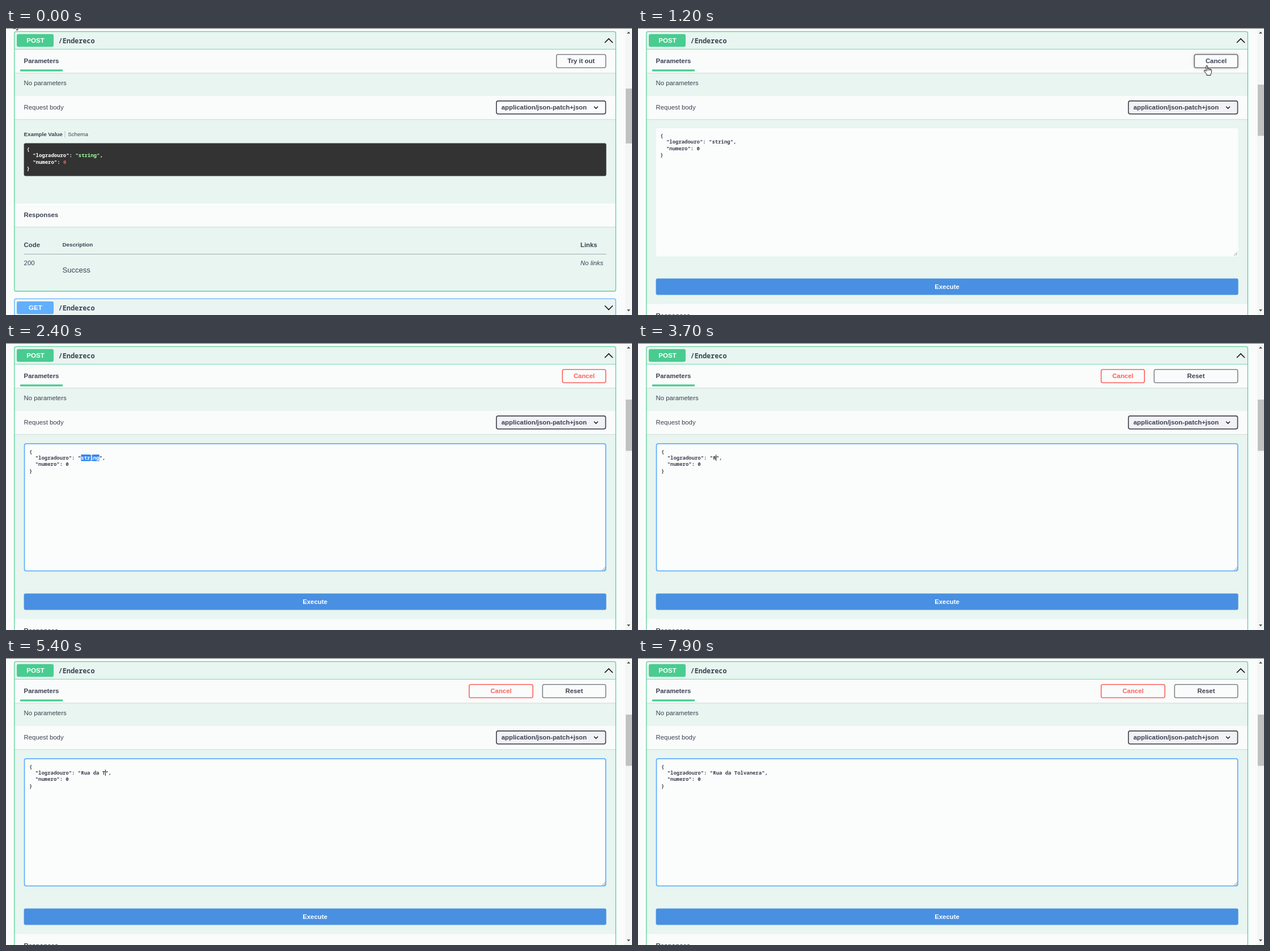
Recreate the animation shown at these times as an HTML page with a canvas. Size 1104 by 507 pixels, loop 8000 ms.

```html
<!DOCTYPE html>
<html lang="pt">
<head>
<meta charset="utf-8">
<title>POST /Endereco</title>
<style>
  html, body { margin: 0; width: 100%; height: 100%; overflow: hidden; background: #fafcfb; }
  canvas { display: block; }
</style>
</head>
<body>
<canvas id="stage" width="1104" height="507"></canvas>
<script>
const ctx = document.getElementById('stage').getContext('2d');
const LOOP = 8000, TICK = 100;
const SANS = '"Liberation Sans", Arial, sans-serif';
const MONO = '"Noto Sans Mono", "DejaVu Sans Mono", monospace';
const INK = '#3b4151', GREEN = '#49cc90', BLUE = '#61affe';
const PANEL = '#e8f5f0', LIGHT = '#fafcfc';
const CHAR = 5.37, LINE = 11.35;
const STREET = 'Rua da Tolvanera';
const KEYS = [3700, 4200, 4400, 4400, 4700, 4800, 5000, 5400,
              5700, 5800, 5900, 6300, 6500, 6600, 7000, 7100];

const clamp = v => Math.max(0, Math.min(1, v));
const easeOut = v => 1 - (1 - clamp(v)) ** 2;
const lerp = (a, b, p) => a + (b - a) * p;
const mix = (a, b, p) => `rgb(${a.map((v, i) => Math.round(lerp(v, b[i], p)))})`;

function rect(x, y, w, h, color) {
  ctx.fillStyle = color;
  ctx.fillRect(x, y, w, h);
}

function box(x, y, w, h, { fill, stroke, line = 1.6, radius = 3, shadow } = {}) {
  ctx.save();
  ctx.beginPath();
  ctx.roundRect(x, y, w, h, radius);
  if (shadow) {
    ctx.shadowColor = `rgba(0,0,0,${shadow.alpha})`;
    ctx.shadowBlur = shadow.blur;
    ctx.shadowOffsetY = shadow.dy || 0;
  }
  if (fill) { ctx.fillStyle = fill; ctx.fill(); }
  ctx.shadowColor = 'transparent';
  if (stroke) { ctx.strokeStyle = stroke; ctx.lineWidth = line; ctx.stroke(); }
  ctx.restore();
}

function text(str, x, y, { size = 11.35, style = '', color = INK, align = 'left', family = SANS } = {}) {
  ctx.font = `${style} ${size}px ${family}`;
  ctx.fillStyle = color;
  ctx.textAlign = align;
  ctx.fillText(str, x, y);
}

const bold = (str, x, y, opts) => text(str, x, y, { style: 'bold', ...opts });
const code = (str, x, y, color = INK) =>
  text(str, x, y, { size: 8.95, style: '600', color, family: MONO });

function polyline(points, color, width) {
  ctx.beginPath();
  points.forEach(([x, y]) => ctx.lineTo(x, y));
  ctx.strokeStyle = color;
  ctx.lineWidth = width;
  ctx.stroke();
}

function chevron(x, y, w, h, width) {
  polyline([[x - w, y - h], [x, y + h], [x + w, y - h]], '#111', width);
}

function button(label, x, w, color, border, shadow = 0) {
  box(x + 0.8, 46.8, w - 1.6, 23.4, {
    fill: LIGHT, stroke: border,
    shadow: shadow > 0 && { alpha: 0.35 * shadow, blur: 5 }
  });
  bold(label, x + w / 2, 62.2, { color, align: 'center' });
}

function sectionHead(y, h = 41) {
  rect(15, y + h, 1060, 1, '#d6e2de');
  rect(15, y + h + 1, 1060, 1, '#e2eeea');
  rect(15, y, 1060, h, LIGHT);
}

function methodRow(y, label, color) {
  box(19, y, 65, 22.5, { fill: color });
  bold(label, 52, y + 15, { size: 11.6, color: '#fff', align: 'center' });
  text('/Endereco', 92.6, y + 15.8, { size: 11.85, style: 'bold', family: MONO });
}

function scrollbar(top, height) {
  rect(1092, 1, 12, 506, '#f4f6f5');
  rect(1093, top, 11, height, '#c1c1c1');
  for (const [y, d] of [[8, -1], [499, 1]]) {
    ctx.beginPath();
    ctx.moveTo(1095, y - d * 1.7);
    ctx.lineTo(1101, y - d * 1.7);
    ctx.lineTo(1098, y + d * 1.7);
    ctx.fillStyle = '#505050';
    ctx.fill();
  }
}

function topSection(bottom, editing) {
  box(14.8, 6.3, 1060.6, bottom - 6.3, { fill: PANEL });
  methodRow(10.8, 'POST', GREEN);
  chevron(1063, 22.5, 7, -3.5, 1.6);
  sectionHead(38);
  rect(15, 37, 1060, 1, '#79d8ad');
  bold('Parameters', 31.6, 62.2);
  rect(25, 73.3, 75, 3.3, GREEN);
  text('No parameters', 31.6, 101.2);
  sectionHead(120);
  text('Request body', 31.6, 144.2);
  box(864.9, 128.9, 192.6, 22.8, {
    fill: editing ? '#f2f2f6' : '#fafbfc', stroke: '#41444e',
    shadow: { alpha: 0.25, blur: 2, dy: 1 }
  });
  bold('application/json-patch+json', 873.8, 144.2);
  chevron(1040.5, 140.5, 3.4, 1.8, 1.4);
}

function outline(bottom) {
  box(14.8, 6.3, 1060.6, bottom - 6.3, { stroke: '#5bd09b', line: 1.3 });
}

function readView(t) {
  topSection(465, false);
  button('Try it out', 970, 88.5, INK, '#80838a', (t - 700) / 300);

  bold('Example Value', 31.6, 191.3, { size: 9.73 });
  rect(103.5, 182, 1, 12, '#b9c3c2');
  text('Schema', 109.2, 191.3, { size: 9.73 });
  box(31.6, 203.5, 1027, 58, { fill: '#333' });
  const x = 36.5, y = 217;
  code('{', x, y, '#fff');
  code('"logradouro":', x + 2 * CHAR, y + LINE, '#fff');
  code('"string"', x + 16 * CHAR, y + LINE, '#a2fca2');
  code(',', x + 24 * CHAR, y + LINE, '#fff');
  code('"numero":', x + 2 * CHAR, y + 2 * LINE, '#fff');
  code('0', x + 12 * CHAR, y + 2 * LINE, '#d36363');
  code('}', x, y + 3 * LINE, '#fff');

  sectionHead(310);
  bold('Responses', 31.6, 334.3);
  bold('Code', 31.6, 387.2);
  bold('Description', 99.6, 386.3, { size: 9.73 });
  bold('Links', 1013, 387.2);
  rect(31.6, 399, 1027, 1, '#9eabab');
  text('200', 31.6, 418.5);
  text('Success', 99.6, 432.4, { size: 12.97 });
  text('No links', 1013, 418.5, { style: 'italic' });
  outline(465);

  box(14.8, 478.4, 1060.6, 60, { fill: '#e9f4f3', stroke: BLUE, line: 1.3 });
  methodRow(483, 'GET', BLUE);
  chevron(1063, 494, 7, 3.5, 1.6);
  scrollbar(107, 97);
}

function editButtons(t) {
  const red = [255, 96, 92];
  if (t < 3700) {
    const p = t < 1400 ? 0 : t < 1500 ? 0.75 : 1;
    button('Cancel', 980.5, 78, mix([59, 65, 81], red, p), mix([110, 113, 120], red, p), 1 - p);
    return;
  }
  const w = lerp(78, 114, easeOut((t - 3700) / 300));
  button('Cancel', 816, w, mix(red, red, 1), mix(red, red, 1));
  button('Reset', 832 + w - 0.5, 227 - w, INK, '#80838a');
}

function editor(t) {
  const focus = t < 2000 ? 0 : easeOut((t - 1900) / 500);
  const line = 1.8 * focus;
  box(31.6, 177, 1027, 226.5, { fill: '#fbfdfc' });
  if (focus) {
    box(31.6 + line / 2, 177 + line / 2, 1027 - line, 226.5 - line,
        { stroke: mix([59, 65, 81], [97, 175, 254], focus), line });
  }
  polyline([[1051, 402], [1057, 396]], '#777', 0.8);
  polyline([[1054, 402], [1057, 399]], '#777', 0.8);

  const x = 39.2 + 1.8 * focus, y = 192.8 + 1.7 * focus;
  const typed = KEYS.filter(k => k <= t).length;
  const value = typed ? STREET.slice(0, typed) : 'string';
  const start = x + 17 * CHAR, row = y + LINE;
  const selected = t >= 2200 && !typed;

  code('{', x, y);
  code('"logradouro": "', x + 2 * CHAR, row);
  if (selected) rect(start, 197, 6 * CHAR, 11.6, '#3487f0');
  code(value, start, row, selected ? '#fff' : INK);
  code('",', start + value.length * CHAR, row);
  code('"numero": 0', x + 2 * CHAR, y + 2 * LINE);
  code('}', x, y + 3 * LINE);

  if (typed && t < 7600) rect(start + typed * CHAR - 0.4, 197.2, 1, 11, '#222');
  if (t >= 2000 && !typed) iBeam(150.5, 203, selected ? '#f4e2c4' : '#222');
}

function editView(t) {
  topSection(540, true);
  editButtons(t);
  editor(t);
  box(31.6, 442.5, 1027, 29, { fill: '#4990e2' });
  bold('Execute', 545, 461, { color: '#fff', align: 'center' });
  sectionHead(487.5);
  bold('Responses', 31.6, 511.5);
  outline(540);
  scrollbar(100, 90.5);
}

function iBeam(x, y, color) {
  polyline([[x, y - 5.5], [x, y + 5.5]], color, 1);
  for (const end of [-5.5, 5.5]) polyline([[x - 2, y + end], [x + 2, y + end]], color, 1);
}

function shape(x, y, path) {
  ctx.save();
  ctx.translate(x, y);
  const p = new Path2D(path);
  ctx.fillStyle = '#fff';
  ctx.strokeStyle = '#111';
  ctx.lineWidth = 1;
  ctx.lineJoin = 'round';
  ctx.fill(p);
  ctx.stroke(p);
  ctx.restore();
}

const arrow = (x, y) => shape(x, y, 'M0 0V13L3 10.3L5 15L7.2 14L5.2 9.5H9.3Z');

function hand(x, y) {
  shape(x, y, 'M0 1.3Q1.2 -.6 2.4 1.3V6.6Q3.8 5.4 4.9 6.9Q6.3 6 7.3 7.4Q9.4 7 9.4 9.2V13' +
              'Q9.2 15 8 16V18H1V16L-3.6 10.8Q-4 8.6 -2 9.1L0 11Z');
  for (const dx of [2.4, 4.9, 7.3]) polyline([[x + dx, y + 7], [x + dx, y + 9.8]], '#111', 0.9);
}

function pointer(t) {
  if (t < 800) {
    const p = t < 200 ? 0 : (t - 100) / 800;
    const s = p * p * (3 - 2 * p);
    arrow(lerp(14, 1002, s), lerp(-11, 66, s) + 60 * Math.sin(Math.PI * s));
  } else if (t < 1400) {
    const p = easeOut((t - 700) / 300);
    hand(lerp(985, 1002, p), lerp(69, 65.5, p));
  } else if (t < 1500) {
    hand(895, 129);
  }
}

function draw(now) {
  const t = Math.floor((now % LOOP) / TICK) * TICK;
  rect(0, 0, 1104, 507, '#fafcfb');
  if (t < 1200) readView(t); else editView(t);
  rect(0, 0, 1104, 1, '#62666a');
  pointer(t);
}

const begin = performance.now();
function loop() {
  draw(performance.now() - begin);
  requestAnimationFrame(loop);
}
loop();
</script>
</body>
</html>
```
